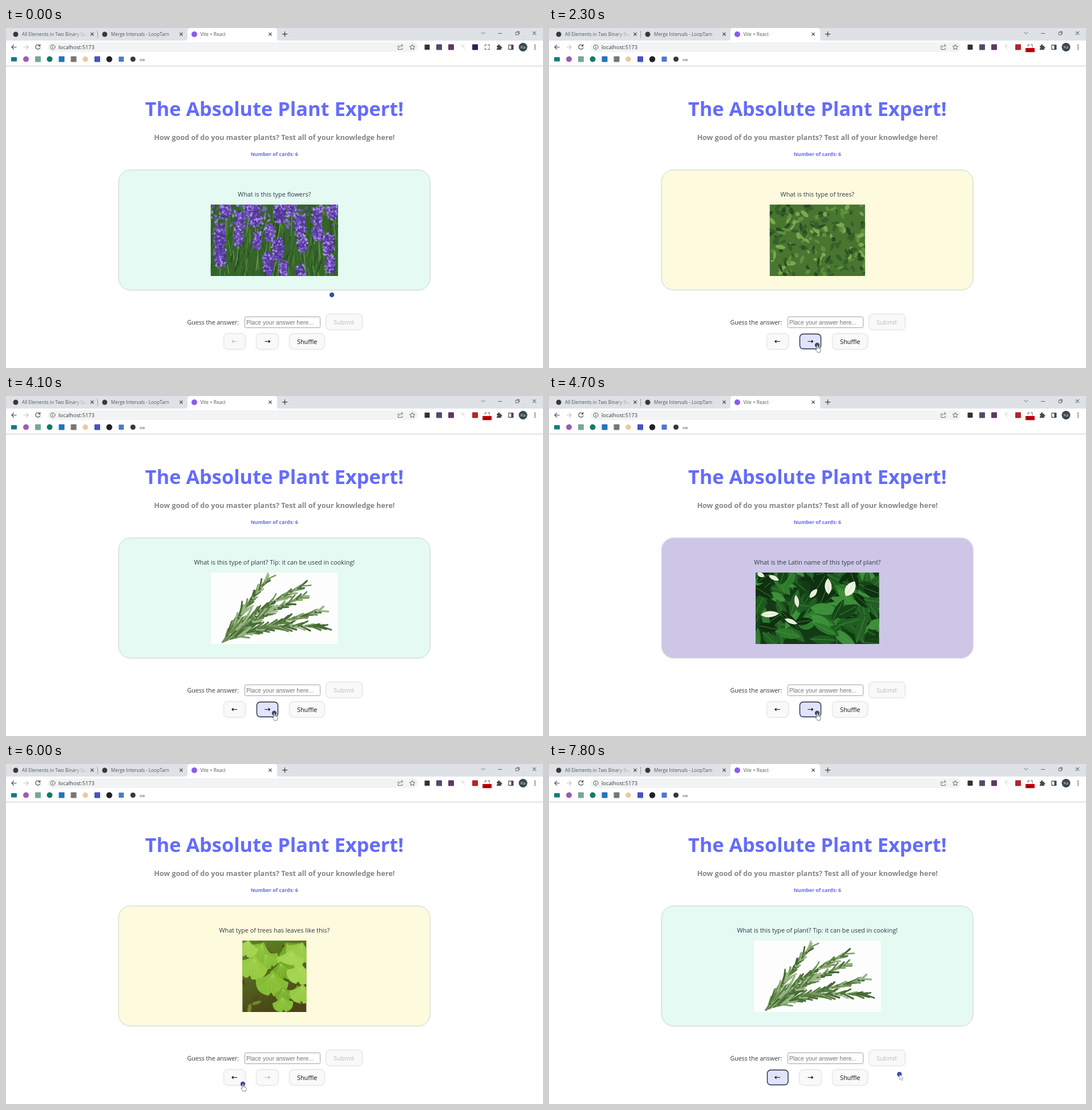
Write an HTML page that moves like this. It is 941 by 595 pixels and loops after 8000 ms.

```html
<!DOCTYPE html>
<html lang="en">
<head>
<meta charset="utf-8">
<title>Plant quiz</title>
<style>
html, body { margin: 0; width: 100%; height: 100%; overflow: hidden; background: #fff }
#stage { display: block; width: 100vw; height: 100vh }
text { font-family: "Open Sans", "Noto Sans", sans-serif }
.line { fill: none; stroke-linecap: round; stroke-linejoin: round }
.button rect { fill: #f9f9f9; stroke: #f0f0f2; filter: drop-shadow(0 0 1.5px #c8c8d0) }
.button { fill: #111; stroke: #111 }
.button text { stroke: none }
.disabled { fill: #bcbcbc; stroke: #bcbcbc }
.focus rect { fill: #e0e3fb; stroke: #242838; stroke-width: 1.4; filter: none }
.card { filter: drop-shadow(0 0 1.5px #dfe3e1) }
</style>
</head>
<body>
<svg id="stage" viewBox="0 0 941 595"></svg>
<script>
const stage = document.getElementById('stage');

// ---- drawing helpers ----
const rect = (x, y, w, h, fill, r = 0, more = '') =>
  `<rect x="${x}" y="${y}" width="${w}" height="${h}" rx="${r}" fill="${fill}" ${more}/>`;
const disc = (x, y, r, fill) => `<circle cx="${x}" cy="${y}" r="${r}" fill="${fill}"/>`;
const line = (d, color = '#4a4d51', w = 1.2) =>
  `<path class="line" d="${d}" stroke="${color}" stroke-width="${w}"/>`;
const shape = (d, fill, more = '') => `<path d="${d}" fill="${fill}" ${more}/>`;
const oval = (x, y, rx, ry, angle, fill) =>
  `<ellipse rx="${rx}" ry="${ry}" fill="${fill}" transform="translate(${x} ${y}) rotate(${angle})"/>`;
const label = (s, x, y, size, fill = '#303a46', more = '') =>
  `<text x="${x}" y="${y}" font-size="${size}" fill="${fill}" ${more}>${s}</text>`;
const centered = (s, y, size, fill, more = '') =>
  label(s, 470.3, y, size, fill, 'text-anchor="middle" ' + more);
const times = (n, f) => Array.from({ length: n }, (_, i) => f(i)).join('');
const each = (list, f) => list.map(f).join('');

let seed = 7;
function rand(a = 0, b = 1) {
  seed = (seed + 0x6D2B79F5) | 0;
  let v = Math.imul(seed ^ (seed >>> 15), 1 | seed);
  v = (v + Math.imul(v ^ (v >>> 7), 61 | v)) ^ v;
  return +(a + (b - a) * ((v ^ (v >>> 14)) >>> 0) / 2 ** 32).toFixed(2);
}
const pick = list => list[Math.floor(rand(0, list.length - 0.01))];

// A picture clipped to its box, always 125 high and centred in the card
const photo = (w, art) => {
  const x = 470.3 - w / 2;
  return `<svg x="${x}" y="309" width="${w}" height="125" viewBox="${x} 309 ${w} 125">${art}</svg>`;
};

// ---- pictures ----
function lavender() {
  const spikes = [[436,330],[480,322],[516,346],[477,388],[565,378],[460,412],[375,398],[375,364],
    [407,366],[410,336],[385,318],[520,376],[547,358],[545,328],[516,429],[440,372],[487,423],
    [572,320],[568,414],[462,358],[500,314],[424,314]];
  const grass = times(230, () => {
    const x = rand(350, 590), y = rand(325, 450);
    return line(`M${x} ${y}l${rand(-9, 9)} ${rand(-34, -14)}`,
      pick(['#4f8a34', '#2b5420', '#6aa348', '#1f4218', '#3f7a2b']), rand(0.7, 1.7));
  });
  const haze = times(110, () => oval(rand(359, 582), rand(309, 350), 3.4, 2, rand(0, 180), pick(['#7a65b8', '#9482c8', '#5c5590'])));
  const stems = each(spikes, ([x, y]) => line(`M${x} ${y}q2 20 ${rand(-6, 6)} 50`, '#6f9a58', 1.2));
  const heads = each(spikes, ([x, y], i) => {
    const big = i < 8 ? 1.2 : 0.9;
    return oval(x, y, 8 * big, 16 * big, 0, '#553b98') + times(60, () => {
      const v = rand(-1, 1), half = 11 * big * (1 - 0.4 * Math.abs(v));
      return oval(x + rand(-half, half), y + v * 17 * big, rand(1.5, 3), rand(1.1, 2.1), rand(0, 180),
        pick(['#6a48b8', '#8a6ad6', '#4a3288', '#a98fe6', '#7654c4']));
    });
  });
  return rect(350, 300, 240, 140, '#35632a') + grass + haze + stems + heads;
}

function foliage(colors, n, box) {
  return times(n, () => oval(rand(box[0], box[1]), rand(309, 434), rand(3, 9), rand(1.5, 4), rand(0, 180), pick(colors)));
}

function cosmos() {
  const pink = '#bd62c8', white = '#f3f1f2';
  const flowers = [[455,314,14,pink],[410,335,12,pink],[466,348,12,pink],[456,370,9,pink],[540,342,8,pink],
    [497,367,15,pink],[421,383,19,pink],[465,430,10,pink],[472,391,5,pink],[550,365,13,'#a3185c'],
    [550,407,12,'#b01c78'],[533,376,12,'#8c1238'],[460,332,13,white],[510,326,19,white],
    [436,352,20,white],[440,423,17,white],[392,428,9,white],[391,327,7,'#d9bf35']];
  const bloom = ([x, y, r, c]) => times(8, i => {
    const a = i * 45 + x, p = a * Math.PI / 180;
    return oval(x + Math.cos(p) * r * 0.55, y + Math.sin(p) * r * 0.45, r * 0.48, r * 0.27, a, c);
  }) + disc(x, y, r * 0.2, '#b99a32');
  const stems = times(60, () => line(`M${rand(387, 554)} ${rand(330, 440)}l${rand(-8, 8)} -30`, pick(['#517a3c', '#3b6630']), 0.8));
  return rect(380, 300, 180, 140, '#2a4426') +
    foliage(['#223a20', '#3d6432', '#4d7840', '#1c2f1c'], 150, [387, 554]) + stems + each(flowers, bloom);
}

const leaf = (x, y, len, wide, angle, fill, rib) =>
  `<g transform="translate(${x} ${y}) rotate(${angle})">` +
  shape(`M0 0C${len * 0.25} ${-wide} ${len * 0.7} ${-wide} ${len} 0C${len * 0.7} ${wide} ${len * 0.25} ${wide} 0 0`, fill) +
  line(`M0 0H${len * 0.9}`, rib, 0.7) + '</g>';

function peaceLily() {
  const leaves = times(130, () => leaf(rand(350, 575), rand(305, 440), rand(30, 58), rand(8, 15), rand(-170, 60),
    pick(['#1d5a1e', '#2c7a2b', '#154517', '#3c8f39', '#235f24', '#0e3010']), '#4f9a46'));
  const white = [[490,347,28,8,-93],[520,350,30,11,-58],[457,353,20,6,-50],[436,370,22,5,-100],
    [371,383,32,7,-4],[413,390,24,5,22],[385,314,20,5,25],[365,310,14,5,25]];
  return rect(355, 300, 230, 140, '#123a14') + leaves +
    each(white, ([x, y, l, w, a]) => leaf(x, y, l, w, a, '#eef3e2', '#cbdcaa'));
}

function ginkgo() {
  const fans = [[452,312,38,115],[425,308,30,100],[490,312,32,60],[520,312,36,110],[452,330,30,60],[500,325,36,95],
    [480,345,34,75],[437,335,42,105],[468,362,44,95],[518,350,36,100],[485,390,25,80],[520,385,34,95],[484,406,28,85]];
  const fan = ([x, y, r, a], i) => `<g transform="translate(${x} ${y}) rotate(${a - 90})">` +
    shape(`M0 0Q${r * 0.3} ${r * 0.3} ${r * 0.65} ${r * 0.4}Q${r * 0.65} ${r * 0.95} ${r * 0.1} ${r}` +
      `L0 ${r * 0.86}L${-r * 0.1} ${r}Q${-r * 0.65} ${r * 0.95} ${-r * 0.65} ${r * 0.4}Q${-r * 0.3} ${r * 0.3} 0 0`,
      ['#86bd35', '#a3d350', '#74ab28', '#97ca42'][i % 4]) +
    times(7, k => line(`M0 ${r * 0.15}L${(k - 3) * r * 0.17} ${r * 0.8}`, '#b7df6c', 0.4)) + '</g>';
  return rect(410, 300, 120, 140, 'url(#shade)') +
    foliage(['#59671d', '#75882a', '#4d4a1c'], 25, [414, 526]) +
    line('M440 305Q470 340 526 372', '#6d5a35', 2) + each(fans, fan);
}

function rosemary() {
  const tips = [[458,320],[520,332],[522,350],[556,404],[552,376]];
  const sprig = ([tx, ty], k) => {
    const cx = 415 + k * 8, cy = 375 + k * 7;
    const at = u => [(1-u)*(1-u)*379 + 2*u*(1-u)*cx + u*u*tx, (1-u)*(1-u)*431 + 2*u*(1-u)*cy + u*u*ty];
    const needles = times(44, i => {
      const u = 0.08 + i / 47, [x, y] = at(u), [nx, ny] = at(u + 0.03);
      const a = Math.atan2(ny - y, nx - x) + (i % 2 ? 1 : -1) * rand(0.1, 0.5), r = rand(14, 28) * (1.1 - u * 0.45);
      const ex = x + Math.cos(a) * r, ey = y + Math.sin(a) * r;
      return line(`M${x} ${y}L${ex} ${ey}`, pick(['#5a7f45', '#7a9c62', '#456b36', '#98b482']), rand(2.4, 3.8));
    });
    return line(`M379 431Q${cx} ${cy} ${tx} ${ty}`, '#78845a', 2) + needles;
  };
  return rect(350, 300, 240, 140, '#fdfdfd') + each(tips, sprig);
}

const shrub = () => rect(380, 300, 180, 140, '#48752f') +
  foliage(['#5d913d', '#34602a', '#79a951', '#294c22'], 170, [385, 556]);

// ---- cards ----
const mint = '#e4faf2', lilac = '#cdc6e7', cream = '#fefadd';
const cards = [
  [mint, 'What is this type flowers?', 223, lavender],
  [cream, 'What is this type of trees?', 167, shrub],
  [lilac, 'What is this type of flowers?', 167, cosmos],
  [mint, 'What is this type of plant? Tip: it can be used in cooking!', 222, rosemary],
  [lilac, 'What is the Latin name of this type of plant?', 216, peaceLily],
  [cream, 'What type of trees has leaves like this?', 112, ginkgo],
];
const card = ([color, question, w, art]) => `<g class="slide">` +
  rect(197.5, 248.5, 545.5, 210, color, 21, `class="card" stroke="${color === lilac ? '#d6d1ea' : '#d3dad6'}"`) +
  centered(question, 294.6, 10.86) + photo(w, art()) + '</g>';

// ---- browser window ----
const cross = (x, y, r, color) => line(`M${x - r} ${y - r}l${2 * r} ${2 * r}m0 ${-2 * r}l${-2 * r} ${2 * r}`, color, 1.1);
const square = (x, y, fill, s = 10) => rect(x - s / 2, y - s / 2, s, s, fill, 1);
const grey = '#5f6368';

const tabs = rect(0, 0, 941, 22, '#dee1e6') +
  shape('M313 22Q318 22 318 17V5Q318 0 323 0H470Q475 0 475 5V17Q475 22 480 22Z', '#fff') +
  disc(17, 11, 4.5, '#3a3835') + disc(173, 11, 4.5, '#3a3835') + disc(330, 11, 5, '#8a5cf0') +
  label('All Elements in Two Binary Sea', 28, 14, 8.2, 'url(#fade)') +
  label('Merge Intervals - LoopTarn', 184, 14, 8.2, '#55585c') +
  label('Vite + React', 340.5, 14, 8.2, '#55585c') +
  each([151, 307, 463], x => cross(x, 10.7, 2.3, '#3c4043')) +
  line('M160.5 5V17', '#9a9da2', 1) + line('M484.5 10.7h8m-4 -4v8', '#3c4043', 1.3) +
  line('M833 7.5l3 3l3 -3', grey, 1) + line('M862.5 9.5h6', grey, 1) +
  line('M893.5 7.5h4.5v4.5h-4.5zM895 7.5v-1.5h4.5v4.5h-1.5', grey, 0.9) + cross(926, 9, 2.7, grey);

const toolbar = line('M18 33.5H10m3.7 -3.8l-3.8 3.8l3.8 3.8') +
  line('M31 33.5h8m-3.7 -3.8l3.8 3.8l-3.8 3.8', '#c3c5c8') +
  line('M59 30.6A4 4 0 1 0 59.8 34.4M59.8 28.8v2.8h-2.8') +
  rect(73, 25, 649, 17, '#f1f3f4', 8.5) +
  line('M86 33.5a4 4 0 1 0 -8 0a4 4 0 1 0 8 0M82 33v2.3M82 31.4v.1', grey, 1) +
  label('localhost:5173', 92, 36.8, 9.35) +
  line('M689 31h-2v6.5h7.5v-2.5M689.5 34q.5 -3.5 5.5 -3.5m-2 -2l2.2 2l-2.2 2', grey, 0.9) +
  shape('M712 28.8l1.4 3l3.3.4l-2.5 2.2l.7 3.3l-2.9 -1.7l-2.9 1.7l.7 -3.3l-2.5 -2.2l3.3 -.4z', 'none', `stroke="${grey}"`) +
  square(738, 33.5, '#333', 9) + square(759, 33.5, '#514a68') + square(780, 33.5, '#5a3b60') +
  line('M798.5 30l5 6m0 -7l-2 2', '#bbbdc0', 1) +
  '<g id="reader">' + square(822, 33.5, 'currentColor') + '</g>' +
  line('M839.5 32v-2.8h2.5m2.5 0h2.5v2.8m0 2v3.5h-2.5m-2.5 0h-2.5v-2.5', grey, 1.1) +
  '<g id="badge">' + rect(835, 35, 16, 7.3, '#c4000c', 0.6) +
  label('', 843, 40.6, 5.2, '#5c0008', 'id="timer" text-anchor="middle"') + '</g>' +
  shape('M860 31h2.4q-.5 -2.4 1.3 -2.4t1.3 2.4h2.6v2.4q2 -.3 2 1.2t-2 1.2v2.4h-7.6v-2.4q1.6 -.3 1.6 -1.3t-1.6 -1.2z', '#44474b') +
  line('M880.8 29.8h8v7.5h-8z', '#44474b', 1.2) + rect(885.3, 29.8, 3.5, 7.5, '#44474b') +
  disc(906, 33.5, 7.5, '#37474f') + label('Ka', 906, 36.3, 7.4, '#dfe6e9', 'text-anchor="middle"') +
  each([30, 33.4, 36.8], y => disc(927, y, 1.05, '#4a4d51'));

const bookmarks = rect(9, 51, 10, 7.5, '#187a83', 1) + disc(35, 54.5, 5, '#a259b4') +
  square(56, 54.5, '#74a798') + disc(76.5, 54.5, 5, '#187868') + square(97.5, 54.5, '#2373c4') +
  square(118.5, 54.5, '#777') + disc(139, 54.5, 4.8, '#eccb9b') + square(160, 54.5, '#4b4fc8') +
  disc(181, 54.5, 5.2, '#1e2126') + square(202, 54.5, '#4d76d8', 9) + disc(222.5, 54.5, 4.5, '#3a3835') +
  label('oa', 234, 57.6, 7.8, '#45484c') + line('M0 66.5H941', '#c9cacc', 1);

// ---- page ----
const button = (id, x, y, w, inner) =>
  `<g id="${id}" class="button">${rect(x + 0.5, y + 0.5, w - 1, 26, '#f9f9f9', 6)}${inner}</g>`;
const arrow = (x, dir) =>
  `<path fill="none" stroke-width="1.2" d="M${x - 4.5 * dir} 548.5h${9 * dir}m${-2.6 * dir} -2.3l${2.6 * dir} 2.3l${-2.6 * dir} 2.3"/>`;
const plain = (s, x, y) => `<text x="${x}" y="${y}" font-size="10.8">${s}</text>`;

const page = centered('The Absolute Plant Expert!', 153.7, 34.35, '#646cff', 'font-weight="700"') +
  centered('How good of do you master plants? Test all of your knowledge here!', 195.7, 12.57, '#858585', 'font-weight="700"') +
  centered('Number of cards: 6', 224.3, 8.8, '#646cf0', 'font-weight="700"') +
  each(cards, card) +
  label('Guess the answer:', 317.5, 518.8, 10.6) +
  rect(418.5, 505.5, 132, 19, '#fff', 2, 'stroke="#a2a2a2"') +
  label('Place your answer here...', 421, 518.8, 10.4, '#757575', 'style="font-family:\'Liberation Sans\',Arial,sans-serif"') +
  button('submit', 561, 501, 63, plain('Submit', 574, 518.8)) +
  button('prev', 382, 535, 37.5, arrow(400.5, -1)) +
  button('next', 439, 535, 38, arrow(458, 1)) +
  button('shuffle', 497, 535, 61, plain('Shuffle', 510, 552.6));

const pointer = '<g id="pointer"><circle id="dot" r="4.2"/>' +
  shape('M0 .5l.5 9l2.1 -2l1.7 3.4l1.5 -.8l-1.6 -3.2l2.8 -.3z', '#fff', 'id="tip" stroke="#888" stroke-width=".7"') +
  shape('M-.8 .8Q.3 -.6 1.2 .8V5L5 5.8Q6.5 6.3 6.2 8.5L5.2 12.5H0L-3 8Q-3.4 6.2 -.8 7.4Z', '#fff', 'id="hand" stroke="#666" stroke-width=".8"') + '</g>';

stage.innerHTML = `<defs>
  <linearGradient id="fade" gradientUnits="userSpaceOnUse" x1="118" x2="144"><stop stop-color="#55585c"/><stop offset="1" stop-color="#dee1e6"/></linearGradient>
  <linearGradient id="shade" x2=".3" y2="1"><stop stop-color="#5f8a22"/><stop offset="1" stop-color="#4a4519"/></linearGradient>
</defs>` + tabs + toolbar + bookmarks + page + pointer;

// ---- timeline ----
const LOOP = 8000, STEP = 100;
const clicks = [[2200, 1], [3000, 1], [4000, 1], [4700, 1], [5200, 1], [6500, -1], [7000, -1]];
const path = [[100,571,467],[400,598,530],[600,560,585],[800,460,592],[900,460,592],[1100,445,578],[1400,470,555],
  [5700,470,555],[6000,415,560],[6300,409,559],[7300,409,559],[7800,614,543]];

const $ = id => document.getElementById(id);
const slides = document.querySelectorAll('.slide');
const show = (el, on) => { el.style.display = on ? '' : 'none'; };

function pointerAt(t) {
  const i = path.findIndex(p => p[0] > t);
  if (i === 0) return path[0].slice(1);
  if (i < 0) return path[path.length - 1].slice(1);
  const [t0, x0, y0] = path[i - 1], [t1, x1, y1] = path[i], u = (t - t0) / (t1 - t0);
  return [x0 + (x1 - x0) * u, y0 + (y1 - y0) * u];
}

function state(id, disabled, focus) {
  $(id).setAttribute('class', 'button' + (disabled ? ' disabled' : '') + (focus ? ' focus' : ''));
}

function draw(t) {
  const done = clicks.filter(c => c[0] <= t);
  const index = done.reduce((sum, c) => sum + c[1], 0);
  const last = done.length ? done[done.length - 1][1] : 0;
  slides.forEach((s, i) => show(s, i === index));
  state('submit', true);
  const nextFocus = last > 0 && index < 5, prevFocus = last < 0;
  state('prev', index === 0, prevFocus);
  state('next', index === 5, nextFocus);

  const [x, y] = pointerAt(t);
  const over = (a, b) => x >= a && x <= b && y >= 535 && y <= 562;
  const onPrev = over(382, 420), onNext = over(439, 477), hand = onPrev || onNext || over(497, 558);
  $('pointer').setAttribute('transform', `translate(${x} ${y})`);
  $('dot').setAttribute('fill', onPrev && prevFocus || onNext && nextFocus ? '#414a66' : '#3c4aa8');
  show($('hand'), hand);
  show($('tip'), !hand && t >= 200);

  show($('badge'), t >= 1000);
  $('reader').style.color = t < 1000 ? '#2b2064' : '#b7202c';
  $('timer').textContent = '0:0' + Math.max(0, Math.floor(t / 1000) - 1);
}

function frame() {
  draw(Math.floor(performance.now() % LOOP / STEP) * STEP);
  requestAnimationFrame(frame);
}
frame();
</script>
</body>
</html>
```
